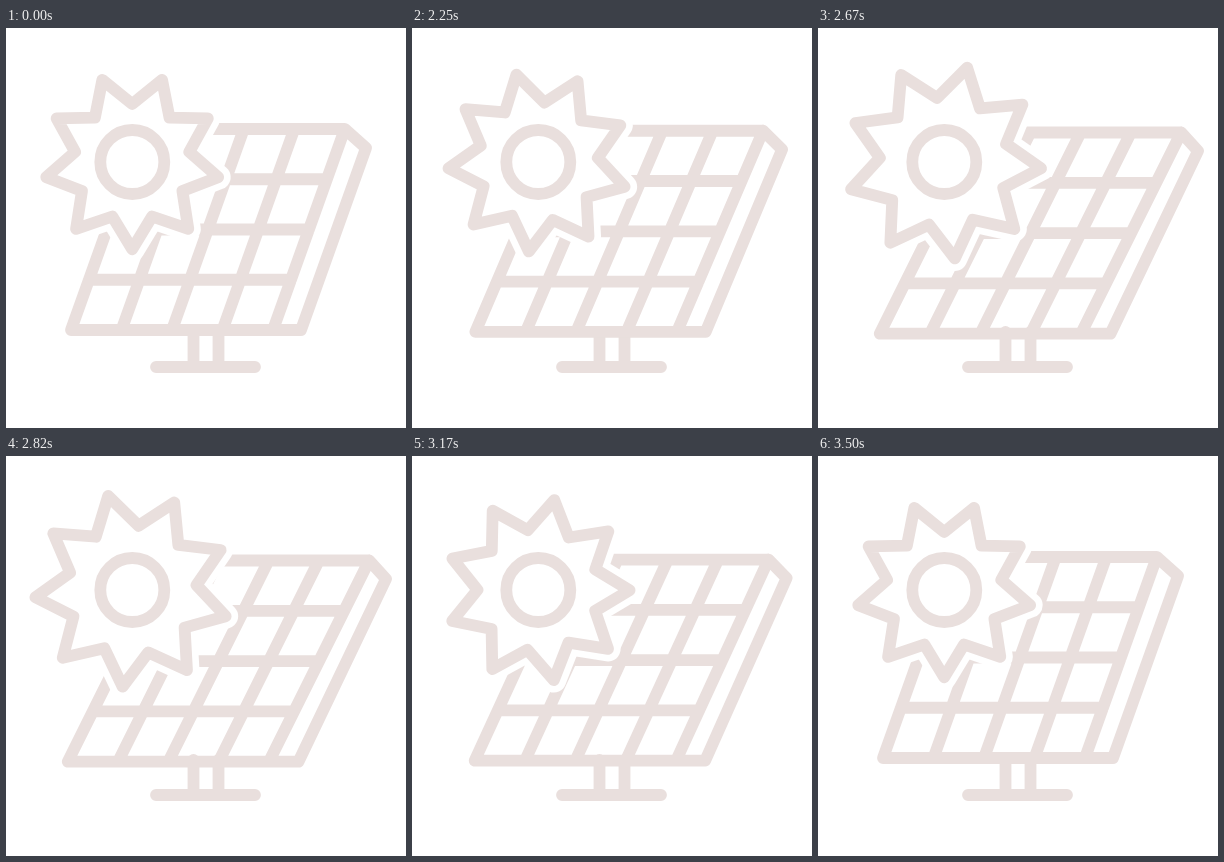
Recreate the animation shown at these times as an HTML page. Size 400x400 px, loop 3520 ms.

```html
<!DOCTYPE html>
<html lang="en">
<head>
<meta charset="utf-8">
<title>Solar panel</title>
<style>
  html, body { margin: 0; width: 100%; height: 100%; overflow: hidden; background: #fff; }
  svg { display: block; width: 100vw; height: 100vh; }
  g { fill: none; stroke: #e9dfdd; stroke-width: 11.8; stroke-linecap: round; stroke-linejoin: round; }
  #halo { fill: #fff; stroke: #fff; stroke-width: 25; }
</style>
</head>
<body>
<svg viewBox="0 0 400 400">
  <g>
    <path d="M187.5 304V339M212.5 304V339M150 339H249"/>
    <path id="panel"/>
    <path id="halo"/>
    <path id="star"/>
    <circle cx="126.3" cy="134" r="32"/>
  </g>
</svg>
<script>
const LOOP = 3520;
const [panel, halo, star] = ['panel', 'halo', 'star'].map(id => document.getElementById(id));

const mix = (a, b, k) => a + (b - a) * k;
// Smooth progress from 0 to 1 between two times
const ease = (t, from, to) => {
  const u = Math.min(1, Math.max(0, (t - from) / (to - from)));
  return u * u * (3 - 2 * u);
};

function starPath(turn, scale) {
  const points = [];
  for (let i = 0; i < 18; i++) {
    const angle = (90 + turn + i * 20) * Math.PI / 180;
    const r = (i % 2 ? 58 : 87.3) * scale;
    points.push(`${126.2 + r * Math.cos(angle)} ${134 + r * Math.sin(angle)}`);
  }
  return `M${points.join('L')}Z`;
}

function panelPath(tilt) {
  const left = mix(65, 61.8, tilt), step = mix(50.5, 50.3, tilt);
  const top = mix(101, 104.5, tilt), bottom = mix(302, 305.6, tilt);
  const lean = mix(71.8, 100.2, tilt), right = left + 4 * step;
  const edgeBottom = mix(295, 292.5, tilt);
  const edgeTop = `${mix(360, 380, tilt)} ${mix(120, 123, tilt)}`;
  let d = `M${left + lean} ${top}H${right + lean}L${edgeTop}L${edgeBottom} ${bottom}H${left}`;
  for (let i = 0; i < 5; i++) {
    const x = left + i * step;
    d += `M${x} ${bottom}L${x + lean} ${top}`;
  }
  for (let i = 1; i < 4; i++) {
    const k = i / 4;
    d += `M${left + lean * k} ${mix(bottom, top, k)}h${4 * step}`;
  }
  return d;
}

function draw() {
  const t = performance.now() % LOOP;
  const turn = 80 * ease(t, 2000, 3500);
  const swell = ease(t, 2000, 2750) - ease(t, 2750, 3500);
  const tilt = ease(t, 2000, 2500) - ease(t, 3000, 3500);
  const shape = starPath(turn, 1 + 0.115 * swell);
  star.setAttribute('d', shape);
  halo.setAttribute('d', shape);
  panel.setAttribute('d', panelPath(tilt));
  requestAnimationFrame(draw);
}
draw();
</script>
</body>
</html>
```
